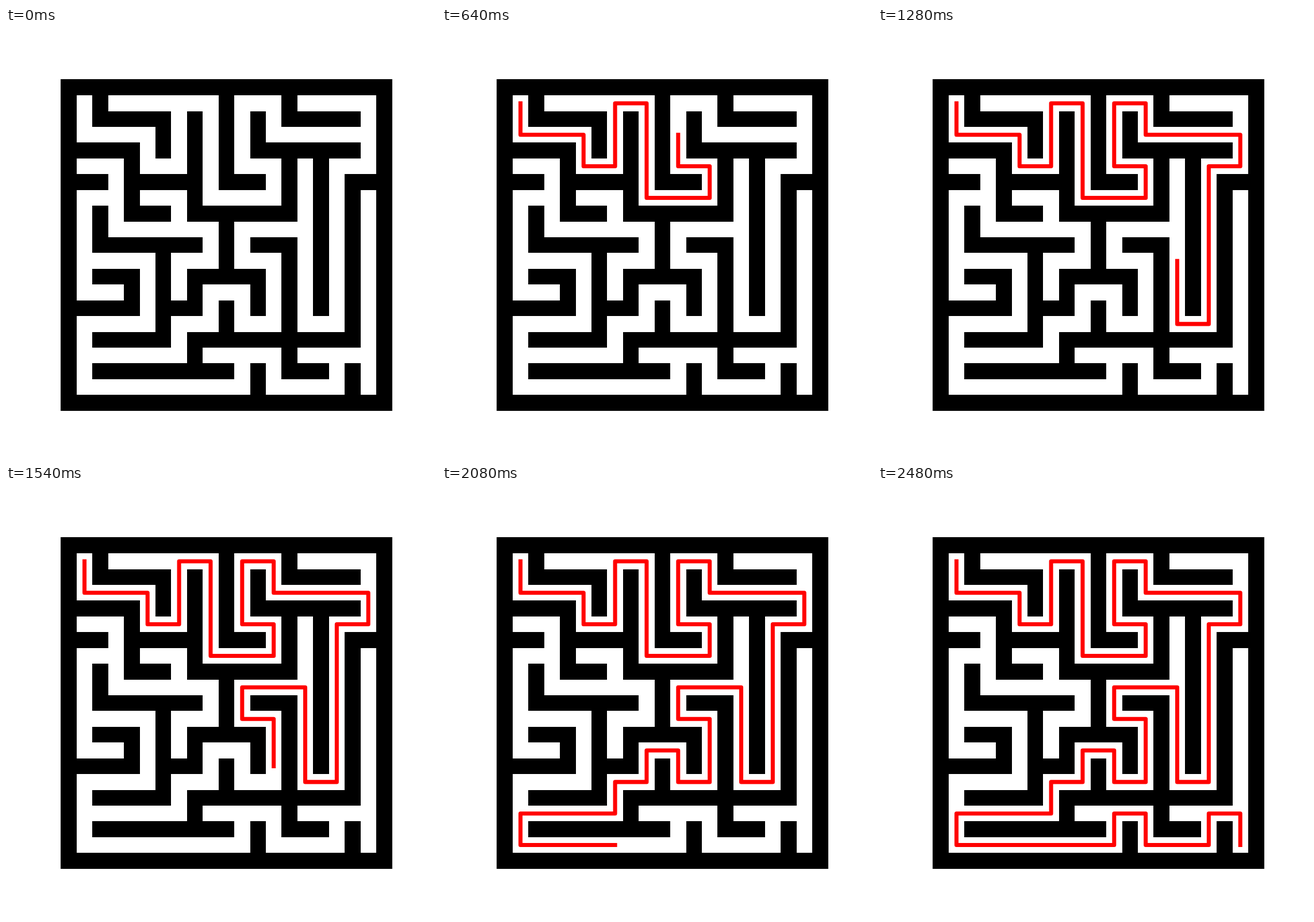
These frames come from a looping animation (748 px wide and 748 px high, 2.5 s). An HTML page:

```html
<!DOCTYPE html>
<html lang="en">
<head>
<meta charset="utf-8">
<title>Maze solver</title>
<style>
  html, body { margin: 0; width: 100%; height: 100%; overflow: hidden; background: #fff; }
  svg { display: block; width: 748px; height: 748px; }
  path { fill: none; stroke-linecap: square; }
  .frame { fill: none; stroke: #000; stroke-width: 20; shape-rendering: crispEdges; }
  .walls { stroke: #000; stroke-width: 1; shape-rendering: crispEdges; }

  /* The route is 124 cells long and grows one cell every 20 ms. */
  .route {
    stroke: #f00;
    stroke-width: .256;
    stroke-linejoin: round;
    stroke-dasharray: 124 300;
    animation: grow 2.5s steps(125) infinite, show 2.5s steps(1) infinite;
  }
  @keyframes grow { from { stroke-dashoffset: 124; } to { stroke-dashoffset: -1; } }
  @keyframes show { 0% { visibility: hidden; } .8%, 100% { visibility: visible; } }
</style>
</head>
<body>
<svg viewBox="0 0 748 748">
  <rect class="frame" x="105" y="99" width="557" height="557"/>
  <!-- One unit is one cell; whole numbers are cell centres. -->
  <g transform="translate(95.4 89.76) scale(27.427) translate(.5 .5)">
    <path class="walls" d="M0 0H20V20H0Z
      M2 0V2H6V4 M0 4H4V8H6 M0 6H2 M4 6H8 M8 2V8H14V4
      M10 0V6H12 M14 0V2H18 M12 2V4H18 M16 4V14
      M20 6H18V16H8V18 M2 18H10 M12 10H14V18H16
      M2 8V10H8 M6 10V16H2 M2 12H4V14H0 M6 14H8V12H12V14
      M10 8V12 M10 14V16 M12 18V20 M18 18V20"/>
    <path class="route" d="M1 1V3H5V5H7V1H9V7H13V5H11V1H13V3H19V5H17V15H15V9H11V11H13V15
      H11V13H9V15H7V17H1V19H11V17H13V19H17V17H19V19"/>
  </g>
</svg>
</body>
</html>
```
